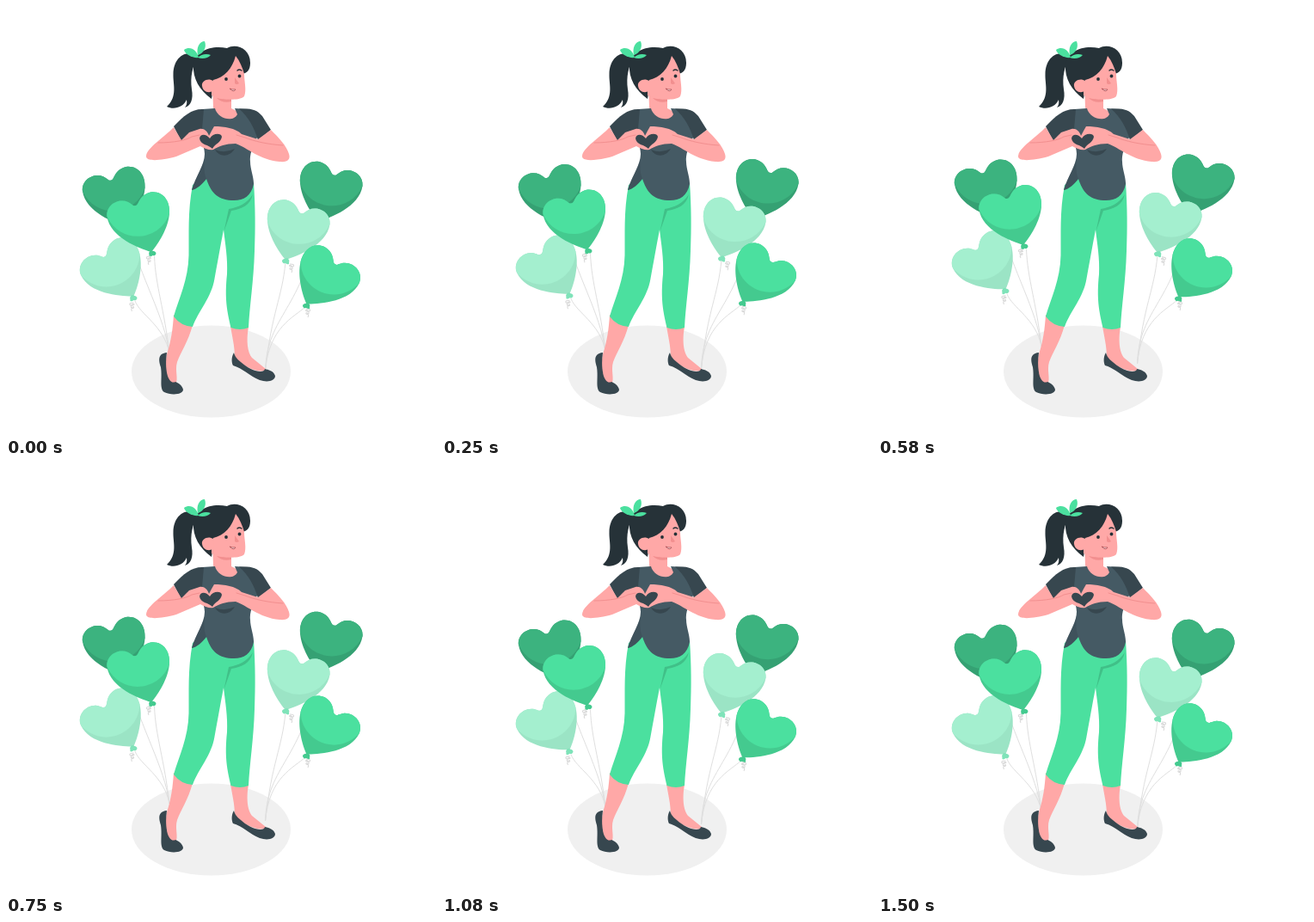
Animation, 500 px wide and 500 px high, one loop 1.54 s. Source, as an HTML page:

```html
<!DOCTYPE html>
<html lang="en">
<head>
<meta charset="utf-8">
<title>Heart balloons</title>
<style>
  html, body { margin: 0; height: 100%; overflow: hidden; background: #fff; }
  svg { display: block; width: 100vw; height: 100vh; }
  .skin { fill: #ffa8a7; }
  .hair { fill: #263238; }
  .shirt { fill: #455a64; }
  .dark { fill: #37474f; }
  .green { fill: #4be09f; }
  .line { fill: none; stroke: #f28f8f; stroke-linecap: round; }
  .string { fill: none; stroke: #dfdfdf; }
  .curl { fill: none; stroke: #d9d9d9; stroke-width: 1.1; }
</style>
</head>
<body>
<svg viewBox="0 0 500 500">
  <defs>
    <!-- Heart with its tip at the origin; fill is the main tone, color the shade -->
    <g id="heart">
      <path fill="currentColor" d="M0 0C-14 -4 -48 -17 -51.500 -41C-53 -54 -39 -63 -27 -58C-21 -55 -22 -53 -18 -54C-14 -55 -15 -66 -1 -69.500C13 -71.500 22 -60 21 -45C20 -28 8 -9 0 0Z"/>
      <path d="M-51.500 -41C-53 -54 -39 -63 -27 -58C-21 -55 -22 -53 -18 -54C-14 -55 -15 -66 -1 -69.500C13 -71.500 22 -60 21 -45C11 -13 -35 -7 -51.500 -41Z"/>
    </g>
    <path id="knot" fill="currentColor" d="M-1 -2C2 -1 5 -1 5 2C4 4 3 5 1 4C-1 6 -4 6 -3 3C-4 1 -3 0 -1 -2Z"/>
    <path id="curl" class="curl" d="M0 5C-7 5 -5 9 -1 8C3 7 -2 5 -3 9C-4 12 1 12 0 10C-1 9 -4 12 -2 15"/>
  </defs>

  <ellipse cx="238.500" cy="425" rx="92.500" ry="53.500" fill="#f0f0f0"/>

  <g id="balloons">
    <g class="string">
      <path d="M172.500 291C174 326 184 352 190 404M141 258C158 320 184 360 190 404M150 343C156 359 184 372 190 404"/>
      <path d="M325 298C321 340 309 355 301.500 424M363 250C345 355 304 358 301.500 424M348 350C335 362 306 373 301.500 424"/>
    </g>
    <g fill="#3cb37f" color="#35a173">
      <use href="#heart" transform="translate(140.500 256.500)"/>
      <use href="#heart" transform="translate(363 250.500) scale(-1 1)"/>
    </g>
    <g fill="#a4efcf" color="#9be4c5">
      <use href="#heart" transform="translate(148.500 337.500) rotate(-17)"/>
      <use href="#heart" transform="translate(325 295) scale(-1 1)"/>
    </g>
    <g fill="#4be09f" color="#44ca8f">
      <use href="#heart" transform="translate(169 286)"/>
      <use href="#heart" transform="translate(349.500 346.500) scale(-1 1) rotate(-17)"/>
      <use href="#knot" x="169.500" y="286"/>
      <use href="#knot" transform="translate(350 347) scale(-1 1)"/>
    </g>
    <g color="#7fe3b9">
      <use href="#knot" x="147.500" y="338"/>
      <use href="#knot" transform="translate(326 295) scale(-1 1)"/>
    </g>
    <use href="#curl" x="168" y="286"/>
    <use href="#curl" x="148.500" y="340"/>
    <use href="#curl" transform="translate(330 295) scale(-1 1)"/>
    <use href="#curl" transform="translate(349 347) scale(-1 1)"/>
  </g>

  <g id="legs">
    <path class="skin" d="M195 359L217 371C212 390 203 403 199 414C196 424 201 434 197 440C188 441 183 425 187 405C192 390 194 375 195 359Z"/>
    <path class="skin" d="M261 372L282 373C279 390 281 403 286 409L302 422C300 429 274 420 266 409C266 395 263 385 261 372Z"/>
    <path class="dark" d="M187 403C177 404 177 411 180 420C182 433 178 445 184 449C192 453 206 452 206 446C205 441 200 438 197 437C189 441 184 424 187 403Z"/>
    <path class="dark" d="M265 403C262 408 262 414 264 418C275 421 283 430 295 435C304 438 313 436 313 430C311 424 305 423 301 422C300 428 285 425 273 414C268 410 266 407 265 403Z"/>
    <path class="green" d="M232 196L217 208C211 240 213 265 212.500 290C212 318 201 340 195 361Q203 372 217 373C224 354 239 339 242.500 317C246 298 249 281 253 260C255 278 258 293 257 312C254 340 257 355 261.500 374Q272 378 282 374C283 350 288 320 289 285C290 258 290 235 288 205Z"/>
    <path fill="#40c088" d="M253.500 262L259 236C270 234 280 230 287 219C284 232 274 236 262 238Z"/>
  </g>

  <g id="torso">
    <path class="skin" d="M240 90L262 100V119L272 124C268 142 246 140 241 118Z"/>
    <path fill="#f28f8f" d="M245 107C250 108 256 109 262 108V111C255 113 249 111 245 107Z"/>
    <path class="shirt" d="M228 120L243 119C246 131 264 136 269 126L266 119L281 120L293 151C286 164 283 174 284 181C284 190 288 198 288 207C285 222 275 227 262 226C245 225 238 216 233 201C228 207 222 213 216 214C220 199 231 185 231 172C231 162 226 160 226 143Z"/>
    <path class="dark" d="M231 174C231 185 220 199 216 214C224 212 229 206 233 201C230 194 230 186 231 174Z" opacity=".4"/>
    <path class="dark" d="M195 140C207 127 217 119 230 120L228 143L204 158Z"/>
    <path class="dark" d="M271 119.500C286 119 291 120 298 128L308 144L293 156C289 142 282 129 271 119.500Z"/>
    <path class="dark" d="M243 167Q254 172 266 166C260 176 248 176 243 167Z"/>
  </g>

  <g id="arms">
    <path class="skin" d="M195 141C185 152 163 165 163 175C163 181 180 180 198 175L226 163C231 166 237 168 241 167C248 163 255 160 267 160C281 165 295 179 318 181C328 182 331 178 329 172C326 162 317 153 308 144L293 155L274 149C267 142 254 140 242 140Q239 145 236 151C234 145 230 142 225 143L213 147L204 156Z"/>
    <path class="dark" d="M225 154C226 148 233 149 237 154C240 148 250 147 251 152C250 159 243 160 240 166C236 161 226 162 225 154Z"/>
    <path class="line" d="M177 159C195 159 210 156 216 152L225 150M322 162C305 161 287 157 278 153L268 150"/>
  </g>

  <g id="head">
    <path class="hair" d="M219 55C205 53 195 62 194.500 79C194 91 200 105 187 117C195 121 206 118 210 109Q211 115 208 118C215 116 218 108 216 97C214 82 217 70 222 62Z"/>
    <path class="hair" d="M239 108C225 98 217 84 218 69C220 52 239 45 257 49C268 43 284 50 284 66C284 75 280 78 275 79L241 95Z"/>
    <path class="skin" d="M267 58C272 64 275 72 277 79C277 88 280 98 277 105C272 110 259 109 247 107L239 104V92L241 86C254 83 263 73 267 58Z"/>
    <path class="skin" d="M241 87C235 83 227 87 228 93C229 100 237 103 242 97Z"/>
    <g class="green">
      <path d="M224 60C217 61 208 56 207 51C214 46 222 51 224 60Z"/>
      <path d="M223 57C221 48 225 41 231 41C234 48 229 56 223 57Z"/>
      <path d="M223 60C227 56 233 55 238 57C235 61 228 62 223 60Z"/>
    </g>
    <g class="hair">
      <circle cx="256" cy="85" r="1.900"/>
      <circle cx="271.500" cy="81.500" r="1.900"/>
    </g>
    <path fill="none" stroke="#263238" stroke-width="1.400" stroke-linecap="round" d="M269 75Q271 73 274 75"/>
    <path fill="#f28f8f" d="M266 83L271 90Q268 92 266 90Z"/>
    <path fill="#fff" stroke="#b85b60" stroke-linejoin="round" d="M260 96Q263 97.500 267 97Q265 101 260 96Z"/>
  </g>
</svg>
<script>
  const LOOP = 1540, RISE = 9, LEAD = 38;
  const balloons = document.getElementById('balloons');

  function draw(now) {
    const phase = (now + LEAD) / LOOP * 2 * Math.PI;
    const y = RISE * (Math.cos(phase) - 1) / 2;
    balloons.setAttribute('transform', `translate(0 ${y.toFixed(2)})`);
    requestAnimationFrame(draw);
  }
  requestAnimationFrame(draw);
</script>
</body>
</html>
```
